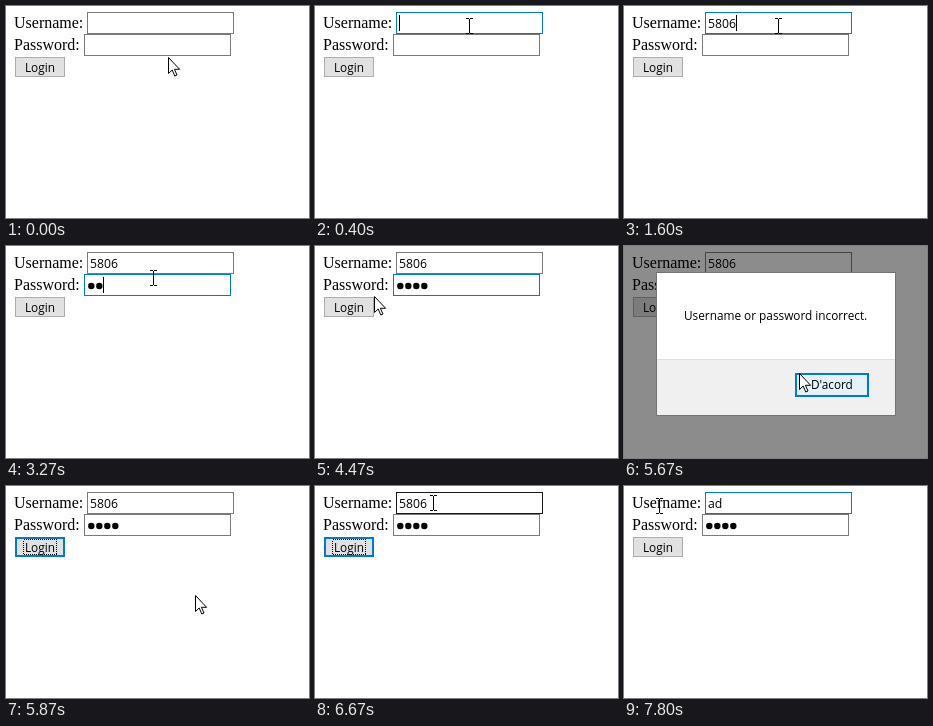
These frames come from a looping animation (303x212 px, 8000 ms). An HTML page:

```html
<!DOCTYPE html>
<html lang="en">
<head>
<meta charset="utf-8">
<title>Login form</title>
<style>
  html, body { margin: 0; width: 100%; height: 100%; overflow: hidden; background: #fff; }
  svg { display: block; }
  rect { shape-rendering: crispEdges; }
  text { font: 11.8px "Open Sans", "Noto Sans", sans-serif; white-space: pre; }
  .label { font: 16px "Liberation Serif", "Times New Roman", serif; }
  .field { font-size: 12.25px; }
</style>
</head>
<body>
<svg id="stage" width="303" height="212" viewBox="0 0 303 212"></svg>
<script>
const stage = document.getElementById("stage");
const FPS = 15, FRAMES = 120, BLUE = "#0078d7";
const USER = "5806";

// Mouse path: [frame, x, y]
const path = [
  [0, 162, 51], [5, 154, 20], [27, 154, 20], [32, 147, 32], [60, 147, 32],
  [65, 66, 48], [66, 66, 48], [67, 59, 50], [68, 39, 52], [72, 39, 52],
  [73, 39, 53], [77, 39, 53], [86, 192, 136], [87, 192, 136], [88, 189, 109],
  [100, 118, 17], [101, 118, 17], [103, 33, 16], [105, 33, 16], [107, 35, 20]
];
const userKeys = [15, 18, 21, 24], passKeys = [45, 49, 53, 57], retypeKeys = [112, 116];

const within = (v, from, to) => v >= from && v < to;
const inside = ([px, py], x, y, w, h) => within(px, x, x + w) && within(py, y, y + h);
const typed = (keys, f) => keys.filter(k => k <= f).length;

const text = (x, y, str, cls = "", fill = "#000") =>
  `<text x="${x}" y="${y}" class="${cls}" fill="${fill}">${str}</text>`;
const fillRect = (x, y, w, h, fill) =>
  `<rect x="${x}" y="${y}" width="${w}" height="${h}" fill="${fill}"/>`;
const box = (x, y, w, h, border, fill, line = 1) =>
  fillRect(x, y, w, h, border) + fillRect(x + line, y + line, w - 2 * line, h - 2 * line, fill);

function mouseAt(f) {
  const i = path.findIndex(p => p[0] > f);
  if (i < 0) return path[path.length - 1].slice(1);
  const [f0, x0, y0] = path[i - 1], [f1, x1, y1] = path[i];
  const k = (f - f0) / (f1 - f0);
  return [Math.round(x0 + (x1 - x0) * k), Math.round(y0 + (y1 - y0) * k)];
}

// The caret restarts its blink at every focus or key press
function caret(x, y, f, events) {
  const last = Math.max(...events.filter(e => e <= f));
  return (f - last) % 16 < 8 ? fillRect(x, y, 1, 16, "#000") : "";
}

const field = (x, y, focused, hovered) =>
  box(x, y, 147, 22, focused ? BLUE : hovered ? "#171717" : "#7a7a7a", "#fff");

function userField(f, mouse, modal) {
  const focused = within(f, 6, 33) || f >= 101;
  const retyping = f >= 112;
  const value = retyping ? "ad".slice(0, typed(retypeKeys, f)) : USER.slice(0, typed(userKeys, f));
  let out = field(81, 6, focused, !modal && inside(mouse, 81, 6, 147, 22));
  out += text(84, 22, value, "field");
  if (within(f, 102, 112)) {
    const start = Math.min(3, Math.max(0, Math.round((mouse[0] - 84) / 7)));
    const x = 84 + 7 * start;
    out += fillRect(x, 9, 112 - x, 16, BLUE) + text(x, 22, USER.slice(start), "field", "#fff");
  } else if (focused && f < 117) {
    out += caret(84 + 7 * value.length, 9, f, [6, ...userKeys, 101, ...retypeKeys]);
  }
  return out;
}

function passField(f, mouse, modal) {
  const focused = within(f, 33, 71), count = typed(passKeys, f);
  let out = field(78, 28, focused, !modal && inside(mouse, 78, 28, 147, 22));
  for (let i = 0; i < count; i++) out += `<circle cx="${85.3 + 8 * i}" cy="40" r="3.2"/>`;
  return focused ? out + caret(81 + 8 * count, 31, f, [33, ...passKeys]) : out;
}

function loginButton(f) {
  const focused = within(f, 88, 101);
  const [border, fill] = within(f, 68, 71) ? [BLUE, "#e5f1fb"]
    : within(f, 71, 73) ? ["#005499", "#cce4f7"]
    : [focused ? BLUE : "#adadad", "#e1e1e1"];
  return box(9, 51, 50, 20, border, fill, focused ? 2 : 1) + text(19, 66, "Login") +
    (focused ? `<rect x="17.5" y="53.5" width="33" height="15" fill="none" stroke="#000" stroke-dasharray="1"/>` : "");
}

function dialog(mouse) {
  const hovered = inside(mouse, 171, 127, 74, 24);
  return fillRect(0, 0, 303, 212, "rgba(0,0,0,.45)") +
    box(32, 26, 240, 144, "#737373", "#fff") +
    fillRect(33, 113, 238, 56, "#f0f0f0") + fillRect(33, 113, 238, 1, "#dfdfdf") +
    text(60, 74, "Username or password incorrect.") +
    box(171, 127, 74, 24, BLUE, hovered ? "#e5f1fb" : "#e1e1e1", 2) +
    text(187, 143, "D'acord");
}

function pointer(mouse, modal) {
  const [x, y] = mouse;
  const overText = !modal && (inside(mouse, 81, 6, 147, 22) ||
    inside(mouse, 78, 28, 147, 22) || inside(mouse, 8, 8, 68, 40));
  return overText
    ? `<path transform="translate(${x} ${y - 8})" d="M-3 .5h3m1 0h3M.5 1v14M-3 15.5h3m1 0h3" fill="none" stroke="#000"/>`
    : `<path transform="translate(${x} ${y})" d="M.5.5v16l3.7-3.5 2.6 6 2.2-1-2.6-5.7h5.2z" fill="#fff" stroke="#000"/>`;
}

function draw(f) {
  const mouse = mouseAt(f), modal = within(f, 73, 88);
  // A drag that began in the field keeps the text cursor
  const dragging = within(f, 101, 104);
  stage.innerHTML =
    text(8, 22, "Username:", "label") + text(8, 44, "Password:", "label") +
    userField(f, mouse, modal) + passField(f, mouse, modal) + loginButton(f) +
    (modal ? dialog(mouse) : "") +
    pointer(mouse, modal && !dragging);
}

const start = performance.now();
let shown = -1;
function tick() {
  const ms = (performance.now() - start) % (FRAMES / FPS * 1000);
  const f = Math.min(FRAMES - 1, Math.floor(ms * FPS / 1000 + 0.06));
  if (f !== shown) draw(shown = f);
  requestAnimationFrame(tick);
}
tick();
</script>
</body>
</html>
```
